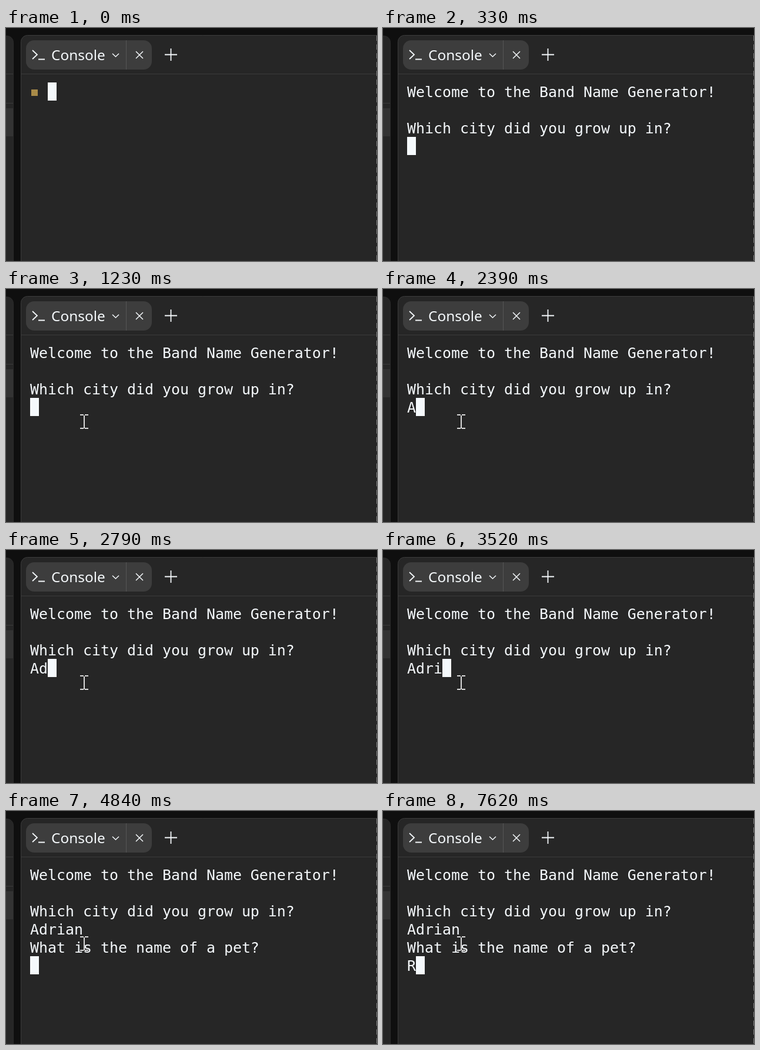
An HTML page with a canvas for the animation above (8000 ms loop, 631 px wide and 398 px high).

```html
<!DOCTYPE html>
<html lang="en">
<head>
<meta charset="utf-8">
<style>
html, body { margin: 0; width: 100%; height: 100%; overflow: hidden; background: #0f0f0f; }
canvas { display: block; }
</style>
</head>
<body>
<canvas id="stage" width="631" height="398"></canvas>
<script>
const c = document.getElementById('stage').getContext('2d');
const LOOP = 8000, LEFT = 41, TOP = 93, CELL = 15, ROW = 31;
const INK = '#f5f9fc', PANEL = '#262626', LINE = '#3b3b3b';

const CITY = 'Adrian', PET = 'R';
const CITY_KEYS = [2390, 2790, 3190, 3520, 3650, 3780];
const PET_KEYS = [7620];

const typed = (text, keys, t) => text.slice(0, keys.filter(k => t >= k).length);

function box(x, y, w, h, fill) {
  c.fillStyle = fill;
  c.fillRect(x, y, w, h);
}

function round(x, y, w, h, radii, fill, stroke) {
  c.beginPath();
  c.roundRect(x, y, w, h, radii);
  c.fillStyle = fill;
  c.fill();
  if (stroke) {
    c.strokeStyle = stroke;
    c.lineWidth = 1;
    c.stroke();
  }
}

function path(d, width) {
  c.strokeStyle = INK;
  c.lineWidth = width;
  c.stroke(new Path2D(d));
}

function drawWindow() {
  box(0, 0, 631, 398, '#0f0f0f');

  // neighbouring pane
  round(-20, 13.5, 32.5, 420, [0, 11, 0, 0], PANEL, '#2b2b2b');
  box(0, 78, 12, 1, LINE);
  box(0, 128, 12, 1, LINE);
  box(0, 137, 12, 48, '#333333');

  // console pane
  round(25.5, 12.5, 640, 420, [11, 0, 0, 0], PANEL, '#3c3c3c');
  box(26, 78, 605, 1, LINE);

  // tab bar
  round(34, 21, 214, 50, 14, '#3d3d3d');
  box(204, 21, 1, 50, '#565656');
  path('M45 38L53 45.5L45 53M55 53.5H66', 1.8);
  path('M181 43.7L186.5 49L192 43.7', 1.5);
  path('M221 40L233 52M233 40L221 52', 1.5);
  path('M270 45.5H291M280.5 35V56', 1.8);
  c.fillStyle = INK;
  c.font = '24.4px "Noto Sans", "Open Sans", sans-serif';
  c.fillText('Console', 77, 55);

  // dashed right edge
  c.setLineDash([9, 6]);
  c.strokeStyle = '#7c7c7c';
  c.lineWidth = 1;
  c.beginPath();
  c.moveTo(630.5, 13);
  c.lineTo(630.5, 398);
  c.stroke();
  c.setLineDash([]);
}

function drawConsole(t) {
  if (t < 330) {
    box(43, 105, 11, 11, '#a98b48');
    box(LEFT + 2 * CELL, TOP, CELL, ROW, INK);
    return;
  }
  const lines = [
    'Welcome to the Band Name Generator!',
    '',
    'Which city did you grow up in?',
    typed(CITY, CITY_KEYS, t)
  ];
  if (t >= 4840) lines.push('What is the name of a pet?', typed(PET, PET_KEYS, t));
  c.fillStyle = INK;
  c.font = '24.92px "DejaVu Sans Mono", monospace';
  lines.forEach((s, i) => c.fillText(s, LEFT, TOP + 25 + i * ROW));
  const last = lines.length - 1;
  box(LEFT + lines[last].length * CELL, TOP + last * ROW, CELL, ROW, INK);
}

function drawPointer(t) {
  if (t < 730) return;
  const p = Math.min(1, Math.floor((t - 730) / 500 * 7 + 1e-6) / 7);
  const e = 1 - (1 - p) ** 2;
  c.save();
  c.translate(Math.round(5 + 128 * e), Math.round(132 + 95 * e));
  c.globalCompositeOperation = 'difference';
  c.fillStyle = '#fff';
  c.fillRect(-1, -11, 2, 22);
  for (const y of [-13, 10]) {
    c.fillRect(-7, y, 6, 2);
    c.fillRect(1, y, 6, 2);
  }
  c.restore();
}

function frame(now) {
  const t = now % LOOP;
  drawWindow();
  drawConsole(t);
  drawPointer(t);
  requestAnimationFrame(frame);
}
requestAnimationFrame(frame);
</script>
</body>
</html>
```
